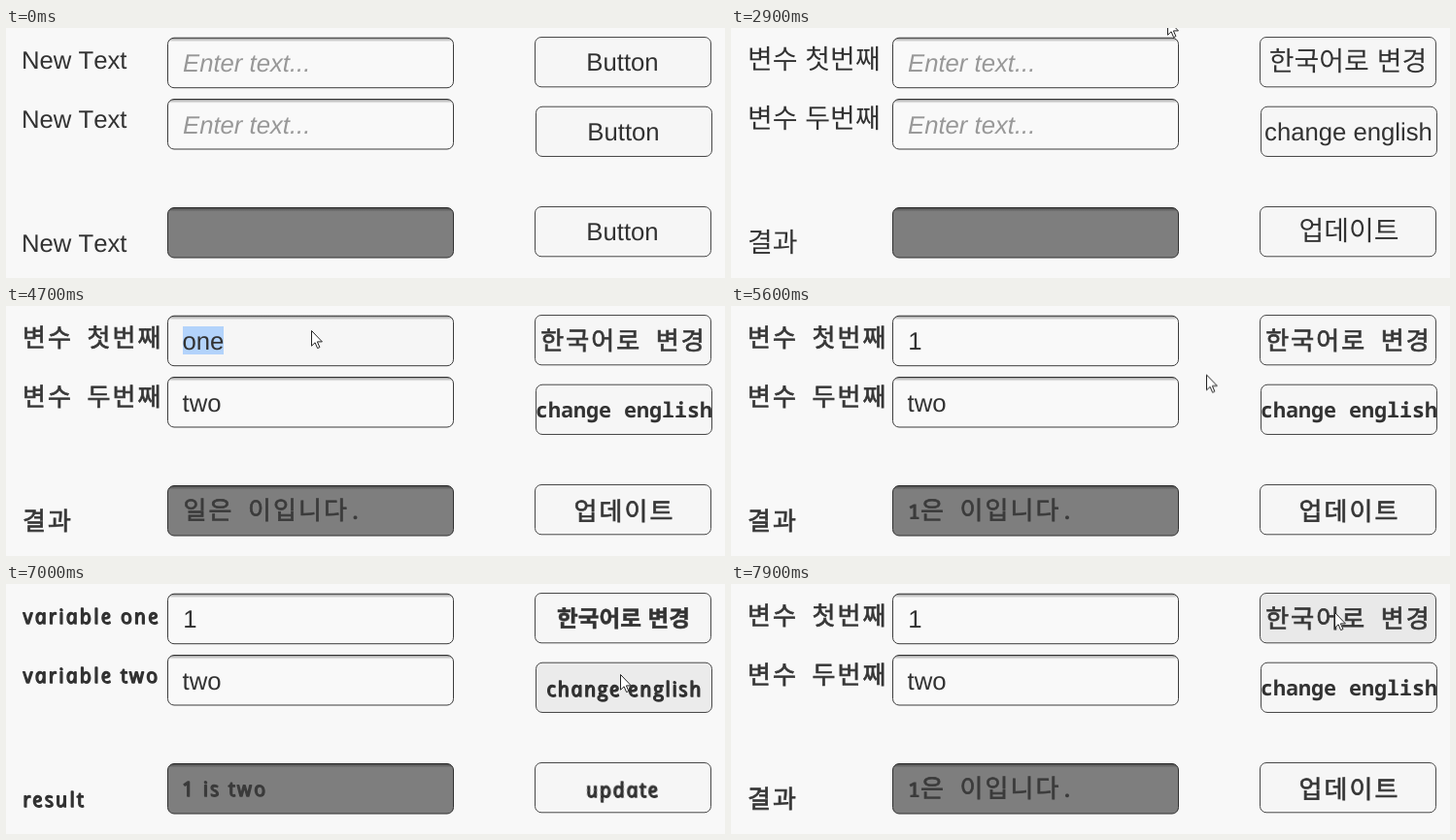
An HTML page for the animation above (8000 ms loop, 740 by 258 pixels).

```html
<!DOCTYPE html>
<html lang="ko">
<head>
<meta charset="utf-8">
<title>Language switch</title>
<style>
html, body { margin: 0; width: 100%; height: 100%; overflow: hidden; background: #f8f8f8; }
svg { display: block; width: 740px; height: 258px; }

text {
  font: 25.7px "Liberation Sans", Arial, sans-serif;
  font-kerning: none;
  text-rendering: geometricPrecision;
  white-space: pre;
  fill: #323232;
}
.mid { text-anchor: middle; }
.hint { font-style: italic; fill: #989898; }
.ko { font: 28px "Noto Sans CJK KR", "Noto Sans CJK", sans-serif; }
/* fixed grid: 26px per syllable, 13px per Latin letter */
.px {
  font: 400 26px "Noto Sans CJK KR", "Noto Sans CJK", sans-serif;
  letter-spacing: 2.08px; word-spacing: 5.1px;
  fill: #363636; stroke: #363636; stroke-width: .7px;
}
.mono {
  font: 700 21.67px "Noto Sans Mono", monospace;
  letter-spacing: 0; word-spacing: 0; stroke: none;
}
/* italic letterforms set upright, with rounded ends */
.hand {
  font: italic 400 21px "Open Sans", sans-serif;
  letter-spacing: 2.2px;
  stroke: #323232; stroke-width: 1.4px; stroke-linejoin: round;
}
.hand.mid { letter-spacing: 1.7px; }
.handko {
  font: 700 23.6px "Noto Sans CJK KR", "Noto Sans CJK", sans-serif;
  stroke: #323232; stroke-width: .5px; stroke-linejoin: round;
}
.out { fill: #3b3b3b; stroke: #3b3b3b; }

.field { fill: #f9f9f9; stroke: #3c3c3c; }
.dark { fill: #7e7e7e; stroke: #303030; }
.btn { fill: #f6f6f6; stroke: #484848; }

.anim { animation: 8s step-end infinite; }
#plain { animation-name: plain; }
#sans { animation-name: sans; }
#pixel { animation-name: pixel; }
#script { animation-name: script; }
#hints { animation-name: hints; }
#typed { animation-name: typed; }
#word { animation-name: word; }
#digit { animation-name: digit; }
#sel { animation-name: sel; }
#outWord { animation-name: outWord; }
#outDigit { animation-name: outDigit; }
#first { animation-name: first; }
#b1 { animation-name: b1; }
#b2 { animation-name: b2; }
#arrow { animation-name: arrow; }

@keyframes plain { 0% { opacity: 1 } 36.25%, 100% { opacity: 0 } }
@keyframes sans { 0% { opacity: 0 } 36.25% { opacity: 1 } 38.75%, 100% { opacity: 0 } }
@keyframes pixel { 0% { opacity: 0 } 38.75% { opacity: 1 } 82.5% { opacity: 0 } 98.75%, 100% { opacity: 1 } }
@keyframes script { 0% { opacity: 0 } 82.5% { opacity: 1 } 98.75%, 100% { opacity: 0 } }
@keyframes hints { 0% { opacity: 1 } 38.75%, 100% { opacity: 0 } }
@keyframes typed { 0% { opacity: 0 } 38.75%, 100% { opacity: 1 } }
@keyframes word { 0% { opacity: 1 } 61.25%, 100% { opacity: 0 } }
@keyframes digit { 0% { opacity: 0 } 61.25%, 100% { opacity: 1 } }
@keyframes sel { 0% { opacity: 0 } 53.75% { opacity: 1 } 61.25%, 100% { opacity: 0 } }
@keyframes outWord { 0% { opacity: 1 } 62.5%, 100% { opacity: 0 } }
@keyframes outDigit { 0% { opacity: 0 } 62.5%, 100% { opacity: 1 } }
@keyframes first { 0% { fill: #f9f9f9 } 53.75% { fill: #f6f6f6 } 65%, 100% { fill: #f9f9f9 } }
@keyframes b1 { 0% { fill: #f6f6f6 } 97.5% { fill: #cdcdcd } 98.75%, 100% { fill: #e9e9e9 } }
@keyframes b2 {
  0% { fill: #f6f6f6 } 81.25% { fill: #cecece } 82.5% { fill: #dcdcdc }
  83.75% { fill: #ebebeb } 97.5%, 100% { fill: #f6f6f6 }
}
@keyframes arrow {
  0% { transform: translate(453px, -40px) }
  28.75% { transform: translate(452px, -14px) }
  30% { transform: translate(449px, -9px) }
  37.5% { transform: translate(449px, -9px); animation-timing-function: steps(6) }
  45% { transform: translate(528px, 41px) }
  47.5% { transform: translate(512px, 43px); animation-timing-function: steps(3) }
  51.25% { transform: translate(189px, 14px) }
  52.5% { transform: translate(189px, 14px); animation-timing-function: steps(5) }
  58.75% { transform: translate(314px, 25px) }
  63.75% { transform: translate(314px, 25px); animation-timing-function: steps(9) }
  75% { transform: translate(629px, 107px) }
  87.5% { transform: translate(632px, 93px); animation-timing-function: steps(2) }
  90% { transform: translate(638px, 70px); animation-timing-function: steps(3) }
  93.75%, 100% { transform: translate(621px, 29px) }
}
</style>
</head>
<body>
<svg viewBox="0 0 740 258" width="740" height="258">
  <defs>
    <linearGradient id="shade" x2="0" y2="1">
      <stop offset="0" stop-opacity=".4"/>
      <stop offset=".08" stop-opacity="0"/>
    </linearGradient>
    <rect id="box" width="294" height="51.5" rx="6.5"/>
    <rect id="key" width="181" height="51.3" rx="6.5"/>
  </defs>

  <g id="first" class="field anim"><use href="#box" x="166.5" y="10.2"/></g>
  <use href="#box" x="166.5" y="73.5" class="field"/>
  <use href="#box" x="166.5" y="185.5" class="dark"/>
  <g fill="url(#shade)">
    <use href="#box" x="166.5" y="10.2"/>
    <use href="#box" x="166.5" y="73.5"/>
    <use href="#box" x="166.5" y="185.5"/>
  </g>
  <g id="b1" class="btn anim"><use href="#key" x="544.5" y="9.5"/></g>
  <g id="b2" class="btn anim"><use href="#key" x="545.5" y="81.2"/></g>
  <use href="#key" x="544.5" y="184.5" class="btn"/>

  <g id="hints" class="anim">
    <text class="hint" x="182" y="45">Enter text...</text>
    <text class="hint" x="182" y="109">Enter text...</text>
  </g>
  <g id="typed" class="anim">
    <rect id="sel" class="anim" x="182" y="21" width="42" height="29" fill="#b3d3fb"/>
    <text id="word" class="anim" x="181.5" y="45">one</text>
    <text id="digit" class="anim" x="182.3" y="45">1</text>
    <text x="181.5" y="108.7">two</text>
  </g>

  <g id="plain" class="anim">
    <text x="16" y="42">New Text</text>
    <text x="16" y="103">New Text</text>
    <text x="16" y="231">New Text</text>
    <text class="mid" x="634.5" y="44">Button</text>
    <text class="mid" x="635.5" y="116">Button</text>
    <text class="mid" x="634.5" y="219">Button</text>
  </g>

  <g id="sans" class="anim">
    <text class="ko" x="17" y="42">변수 첫번째</text>
    <text class="ko" x="17" y="103">변수 두번째</text>
    <text class="ko" x="17" y="231">결과</text>
    <text class="ko mid" x="635" y="44">한국어로 변경</text>
    <text class="mid" x="635.5" y="116">change english</text>
    <text class="ko mid" x="636" y="219">업데이트</text>
  </g>

  <g id="pixel" class="anim">
    <text class="px" x="17" y="42">변수 첫번째</text>
    <text class="px" x="17" y="103">변수 두번째</text>
    <text class="px" x="17" y="231">결과</text>
    <text class="px mid" x="635.5" y="45">한국어로 변경</text>
    <text class="mono mid" x="636" y="115">change english</text>
    <text class="px mid" x="636.5" y="220.5">업데이트</text>
    <text id="outWord" class="px out anim" x="182.5" y="220">일은 이입니다<tspan class="mono">.</tspan></text>
    <text id="outDigit" class="px out anim" x="182" y="220"><tspan class="mono">1</tspan>은 이입니다<tspan class="mono">.</tspan></text>
  </g>

  <g id="script" class="anim">
    <text class="hand" transform="translate(19 41.3) skewX(12)">variable one</text>
    <text class="hand" transform="translate(19 102.3) skewX(12)">variable two</text>
    <text class="hand" transform="translate(18.5 230) skewX(12)">result</text>
    <text class="handko mid" x="635.5" y="44.4">한국어로 변경</text>
    <text class="hand mid" transform="translate(638 116) skewX(12)">change english</text>
    <text class="hand mid" transform="translate(636 219.5) skewX(12)">update</text>
    <text class="hand out" transform="translate(182.5 219) skewX(12)">1 is two</text>
  </g>

  <g id="arrow" class="anim">
    <path d="M.5 .5V16.2L4.1 12.8L6.6 18.6L8.9 17.6L6.4 11.9H11.4Z" fill="#fff" stroke="#222"/>
  </g>
</svg>
</body>
</html>
```
